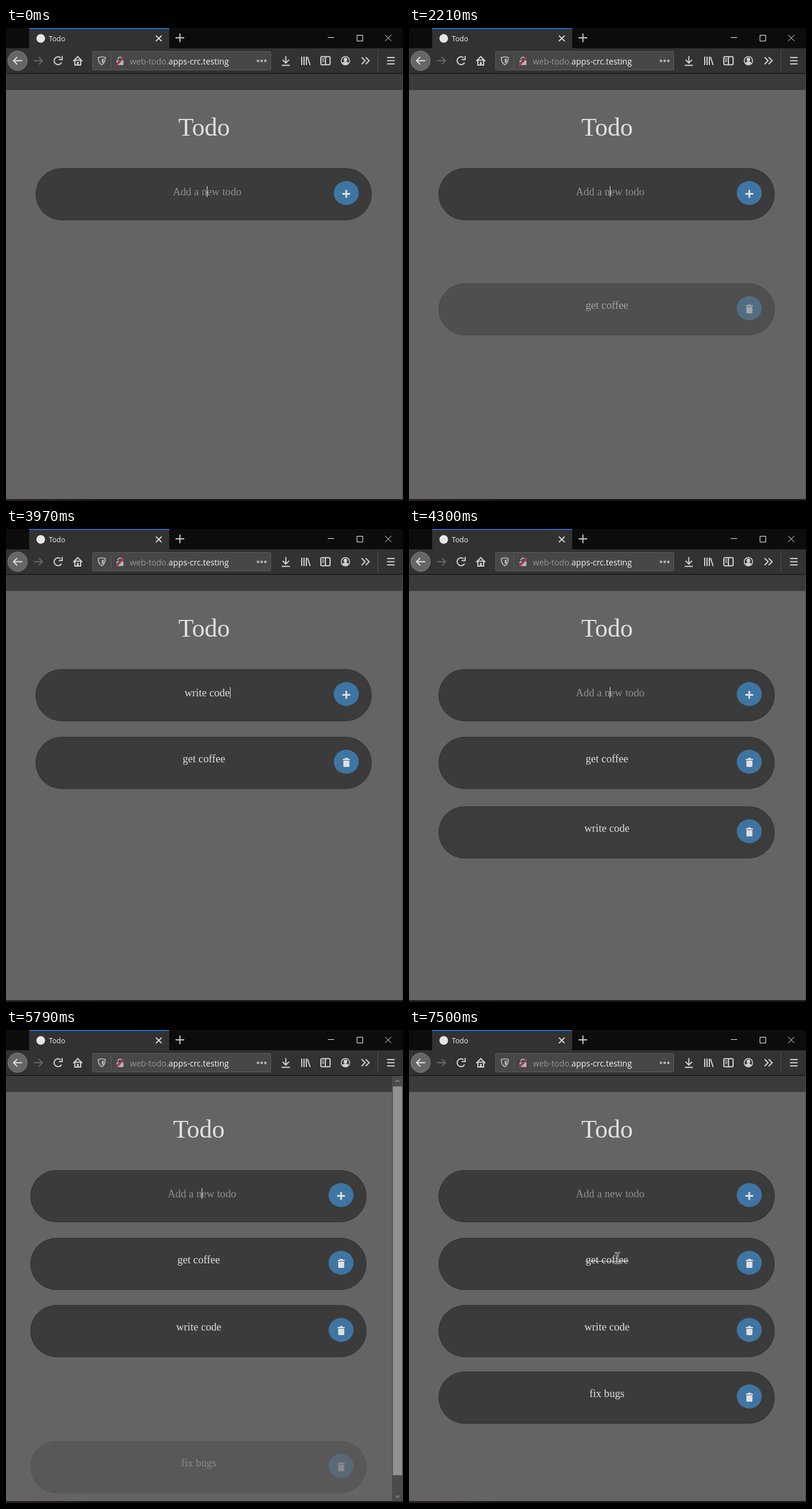
An HTML page with a canvas that plays this animation: 686x817 px, repeating every 8 s.

```html
<!DOCTYPE html>
<html lang="en">
<head>
<meta charset="utf-8">
<title>Todo</title>
<style>
html, body { margin: 0; width: 100%; height: 100%; overflow: hidden; background: #646464; }
canvas { display: block; }
</style>
</head>
<body>
<canvas id="stage" width="686" height="817"></canvas>
<script>
const ctx = document.getElementById('stage').getContext('2d');
const SERIF = '"Liberation Serif", "Times New Roman", serif';
const SANS = '"Open Sans", "Noto Sans", sans-serif';
const PI = Math.PI;
const PAGE = '#646464', PANEL = '#3b3b3b', LIGHT = '#e0e0e0', ICON = '#d0d0d0', BAR = '#323233';

const LOOP = 8000, BLINK = 530, STRIKE = 7340;
const FLY_MS = 172, FLY_Y = 170, STEP = 85;

// Typing runs evenly from start to end; the new item flies in from fly, first seen at shown.
const todos = [
  { text: 'get coffee', start: 700, end: 1800, submit: 2120, fly: 2173, shown: 2210 },
  { text: 'write code', start: 2840, end: 3970, submit: 4130, fly: 4172, shown: 4210 },
  { text: 'fix bugs', start: 4800, end: 5570, submit: 5790, fly: 5771, shown: 5790 }
];
const restTop = i => Math.round(358.9 + 115.7 * i);

function rect(x, y, w, h, fill) {
  ctx.fillStyle = fill;
  ctx.fillRect(x, y, w, h);
}

function text(str, x, y, size, color, family = SERIF, align = 'center') {
  ctx.font = `${size}px ${family}`;
  ctx.textAlign = align;
  ctx.fillStyle = color;
  ctx.fillText(str, x, y);
}

function pen(color, width) {
  ctx.strokeStyle = color;
  ctx.lineWidth = width;
}

function seg(x1, y1, x2, y2) {
  ctx.beginPath();
  ctx.moveTo(x1, y1);
  ctx.lineTo(x2, y2);
  ctx.stroke();
}

// Open arrow head with its tip at x, y, pointing along angle.
function chevron(x, y, angle, size) {
  const wing = a => [x + size * Math.cos(a), y + size * Math.sin(a)];
  ctx.beginPath();
  ctx.moveTo(...wing(angle + PI * 0.75));
  ctx.lineTo(x, y);
  ctx.lineTo(...wing(angle - PI * 0.75));
  ctx.stroke();
}

function cross(x, y, r, angle) {
  for (const a of [angle, angle + PI / 2]) {
    const dx = r * Math.cos(a), dy = r * Math.sin(a);
    seg(x - dx, y - dy, x + dx, y + dy);
  }
}

function bars(x, y, w, gap) {
  for (let i = 0; i < 3; i++) seg(x, y + i * gap, x + w, y + i * gap);
}

function arc(x, y, r, from = 0, to = 2 * PI) {
  ctx.beginPath();
  ctx.arc(x, y, r, from, to);
  ctx.stroke();
}

function disc(x, y, rx, ry, fill) {
  ctx.fillStyle = fill;
  ctx.beginPath();
  ctx.ellipse(x, y, rx, ry, 0, 0, 2 * PI);
  ctx.fill();
}

function box(x, y, w, h, r, fill, outlined) {
  ctx.beginPath();
  ctx.roundRect(x, y, w, h, r);
  if (fill) { ctx.fillStyle = fill; ctx.fill(); }
  if (outlined) ctx.stroke();
}

function drawTabs() {
  rect(0, 0, 686, 35, '#0c0c0c');
  rect(40, 0, 242, 35, BAR);
  rect(40, 0, 242, 1.5, '#0a84ff');
  disc(60, 18, 7.5, 7.5, '#e6e6e6');
  text('Todo', 74, 22.5, 12.3, '#f0f0f0', SANS, 'left');
  pen('#e4e4e4', 1.8);
  cross(264, 18, 7, PI / 4);
  pen('#c8c8c8', 2);
  cross(300.5, 17, 7.5, 0);
  pen('#f4f4f4', 1);
  seg(556, 16.5, 567, 16.5);
  box(606.5, 12.5, 10, 10, 0, null, true);
  cross(660.5, 17.2, 7.5, PI / 4);
}

function drawShield(x, y, size) {
  ctx.beginPath();
  ctx.moveTo(x, y - size);
  ctx.quadraticCurveTo(x + size / 2, y - size * 0.8, x + size * 0.85, y - size * 0.8);
  ctx.quadraticCurveTo(x + size * 0.9, y + size * 0.5, x, y + size);
  ctx.quadraticCurveTo(x - size * 0.9, y + size * 0.5, x - size * 0.85, y - size * 0.8);
  ctx.quadraticCurveTo(x - size / 2, y - size * 0.8, x, y - size);
  ctx.stroke();
  rect(x, y - size * 0.5, size * 0.45, size, '#b9b9ba');
}

function drawAddressBar() {
  pen('#5d5d5e', 1);
  box(149.5, 40.5, 308, 32, 2, '#474748', true);
  seg(181.5, 45, 181.5, 69);
  pen('#b9b9ba', 1.8);
  drawShield(165.5, 56.5, 7);

  arc(197, 54, 3.6, PI, 2 * PI);
  box(191, 55.5, 12, 8.5, 1.5, '#b4b4b5');
  pen('#474748', 4);
  seg(190, 64.5, 204, 49.5);
  pen('#d92b50', 2);
  seg(190.5, 64.5, 203.5, 50.5);

  text('web-todo.', 214, 62.7, 14.2, '#969697', SANS, 'left');
  const hostX = 214 + ctx.measureText('web-todo.').width;
  text('apps-crc.testing', hostX, 62.7, 14.2, '#f6f6f6', SANS, 'left');
  for (let i = 0; i < 3; i++) disc(435.5 + 6.3 * i, 56.7, 2.2, 2.2, '#b4b4b5');
}

function drawNav() {
  const y = 56.5;
  rect(0, 35, 686, 43, BAR);
  rect(0, 78, 686, 1, '#0c0c0c');

  pen('#7b7b7c', 1);
  disc(20, y, 17, 17, '#666667');
  arc(20, y, 16.7);
  pen('#e2e2e2', 2);
  seg(28, y, 13, y);
  chevron(13, y, PI, 9);
  pen('#68686a', 2);
  seg(48, y, 63, y);
  chevron(63, y, 0, 9);

  // Reload and home
  pen(ICON, 2);
  arc(90, y, 6.8, 0.5, 5.4);
  chevron(97, y - 2, PI / 4, 6);
  chevron(124, y - 7, -PI / 2, 11);
  box(119, y - 1, 10, 8.5, 0, null, true);
  rect(122.5, y + 2, 3.2, 5.5, ICON);

  drawAddressBar();

  // Download, library, sidebar
  pen(ICON, 2);
  seg(483.5, 48.5, 483.5, 60);
  chevron(483.5, 60.5, PI / 2, 8);
  seg(476.5, 64.5, 490.5, 64.5);
  for (let i = 0; i < 3; i++) seg(511 + 4 * i, 49.5, 511 + 4 * i, 64);
  seg(521, 50, 525.5, 64);
  box(544, 49.5, 16, 14, 2, null, true);
  seg(552, 50, 552, 63);
  pen(ICON, 1.2);
  bars(546, 53, 4, 2.5);

  // Account
  pen(ICON, 1.6);
  arc(586.5, y, 7.2);
  disc(586.5, 54.5, 3.2, 3.6, ICON);
  disc(586.5, 60.5, 4.8, 2.4, ICON);

  pen(ICON, 2);
  chevron(620.5, y, 0, 8.5);
  chevron(627.5, y, 0, 8.5);
  bars(658.5, 51, 13, 5.5);
  pen('#515152', 1);
  seg(642.5, 38, 642.5, 75);
}

function drawPill(top) {
  pen('#303030', 1);
  box(51.5, top + 0.5, 580, 89, 44.5, PANEL, true);
  disc(588, top + 43, 21.6, 20.7, '#3f75a2');
}

function drawTrash(y) {
  box(582, y + 1, 12.4, 2, 0.5, LIGHT);
  box(585.4, y - 0.5, 5.6, 2, 0.5, LIGHT);
  box(583, y + 4, 10.4, 11, [0, 0, 1.5, 1.5], LIGHT);
}

// Share of the flight still ahead, refreshed once per step.
function flyRest(todo, t) {
  const held = todo.shown + Math.floor((t - todo.shown) / STEP) * STEP;
  const p = Math.min(1, Math.max(0, (held - todo.fly) / FLY_MS));
  return (1 - p) ** 3;
}

function drawItem({ todo, top, rest }, struck) {
  drawPill(top);
  drawTrash(top + 37);
  text(todo.text, 342, top + 44, 18.67, LIGHT);
  if (struck) rect(305, top + 40, 74.5, 1, LIGHT);
  // Fade the item as a whole by veiling it with the page colour.
  ctx.globalAlpha = rest;
  rect(51, top - 1, 582, 92, PAGE);
  ctx.globalAlpha = 1;
}

function caretLit(t) {
  if (t >= STRIKE) return false;
  const last = todos.map(d => d.submit).filter(s => s <= t).pop() ?? -185;
  return Math.floor((t - last + 195) / BLINK) % 2 === 0;
}

function drawInput(t) {
  drawPill(242);
  pen(LIGHT, 3);
  cross(588, 286.5, 6.8, 0);
  const active = todos.find(d => t >= d.start && t < d.submit);
  let caretX = 347;
  if (active) {
    const { text: full, start, end } = active;
    const count = 1 + Math.floor((t - start) / (end - start) * (full.length - 1) + 1e-6);
    const typed = full.slice(0, count);
    text(typed, 347.5, 289, 18.67, LIGHT);
    caretX = Math.round(347.5 + ctx.measureText(typed).width / 2);
  } else {
    text('Add a new todo', 347.5, 289, 18.67, '#8f8f8f');
  }
  if (active || caretLit(t)) rect(caretX, 273, 1, 19, '#e6e6e6');
}

function drawScrollbar(overflow) {
  rect(667, 79, 19, 735, '#4b4b4c');
  rect(668.5, 97.5, 16, 699 * 735 / (735 + overflow), '#919192');
  pen('#8a8a8b', 1.6);
  chevron(676.5, 86.5, -PI / 2, 5);
  chevron(676.5, 807.5, PI / 2, 5);
}

function drawArrow(x, y) {
  for (const [color, width] of [['#000', 4.5], ['#fff', 2.5]]) {
    pen(color, width);
    seg(x + 4, y + 10, x + 7, y + 17.5);
  }
  ctx.fillStyle = '#fff';
  ctx.beginPath();
  ctx.moveTo(x, y);
  ctx.lineTo(x, y + 16);
  ctx.lineTo(x + 11.3, y + 11.5);
  ctx.closePath();
  ctx.fill();
  pen('#000', 1);
  ctx.stroke();
}

function drawBeam(x, y) {
  for (const [color, width] of [['#c4c8ca', 2.6], ['#2c2c2c', 0.9]]) {
    pen(color, width);
    seg(x, y - 8, x, y + 8);
    for (const end of [y - 9, y + 9]) seg(x - 5, end, x + 5, end);
  }
}

function drawMouse(t) {
  const begin = 6710, step = 78;
  if (t < begin) return;
  const p = Math.min(1, Math.floor((t - begin) / step) / 6);
  const ease = p * p * (3 - 2 * p);
  const x = 626 - 266 * ease, y = 372 + 22 * ease;
  (x < 380 ? drawBeam : drawArrow)(x, y);
}

function drawWindowEdge() {
  rect(685, 79, 1, 735, '#484848');
  rect(0, 813, 686, 1, '#505050');
  const edge = ctx.createLinearGradient(0, 0, 150, 0);
  edge.addColorStop(0, '#2a1d20');
  edge.addColorStop(1, '#181416');
  rect(0, 814, 686, 3, edge);
}

function draw(t) {
  rect(0, 0, 686, 817, PAGE);
  rect(0, 79, 686, 28, PANEL);

  const items = todos
    .map((todo, i) => {
      const rest = flyRest(todo, t);
      return { todo, rest, top: Math.round(restTop(i) + rest * FLY_Y) };
    })
    .filter(({ todo }) => t >= todo.shown);
  const bottom = Math.max(0, ...items.map(i => i.top + 90));
  const overflow = Math.max(0, bottom + 44 - 814);

  ctx.save();
  if (overflow) ctx.translate(-9, 0);
  text('Todo', 342.3, 186, 43.6, LIGHT);
  drawInput(t);
  items.forEach((item, i) => drawItem(item, i === 0 && t >= STRIKE));
  ctx.restore();

  if (overflow) drawScrollbar(overflow);
  drawMouse(t);
  drawWindowEdge();
  drawTabs();
  drawNav();
}

const began = performance.now();
function tick() {
  draw((performance.now() - began) % LOOP);
  requestAnimationFrame(tick);
}
tick();
</script>
</body>
</html>
```
